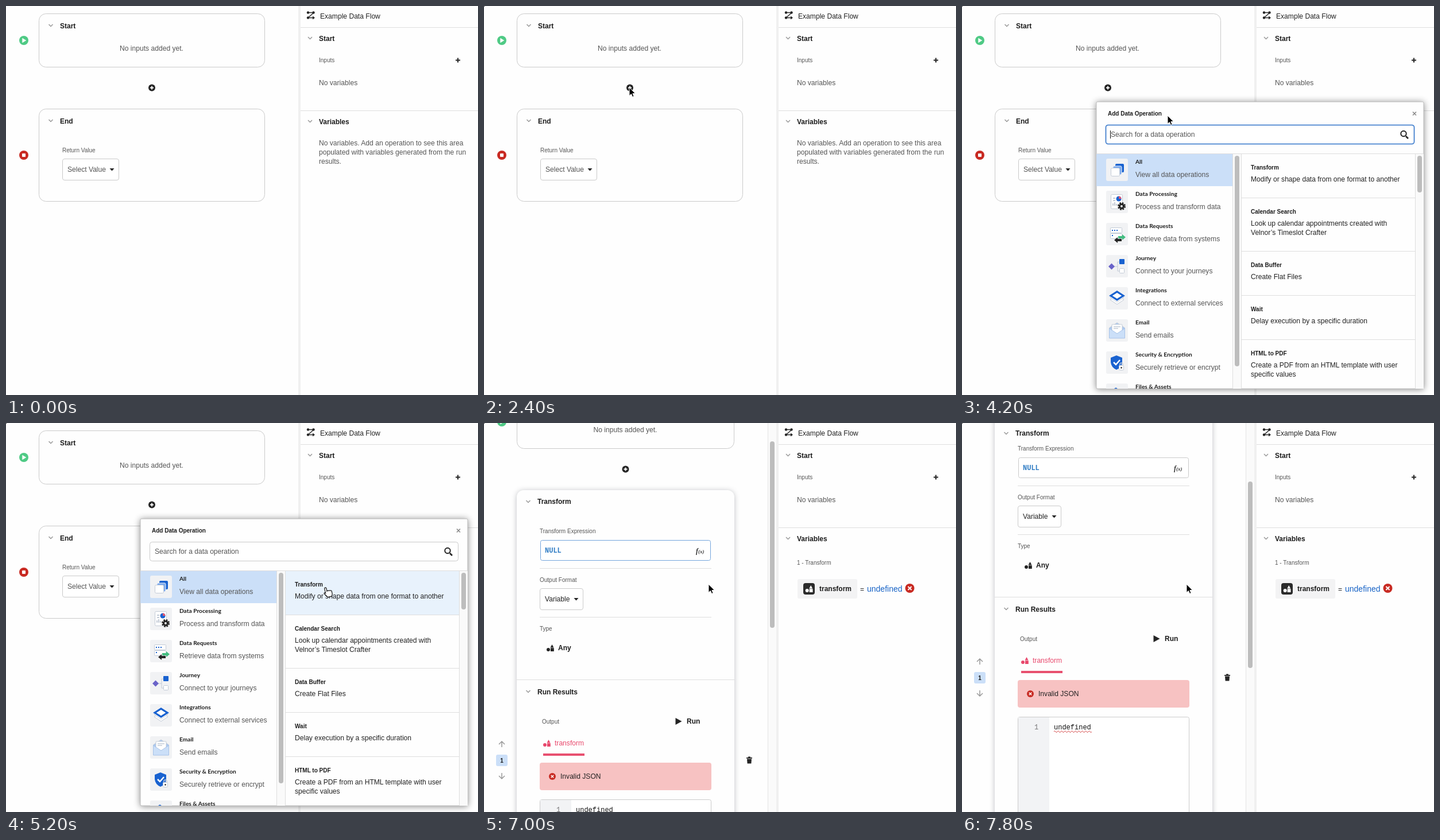
Animation, 822 px wide and 678 px high, one loop 8 s. Source, as an HTML page:

```html
<!DOCTYPE html>
<html lang="en">
<head>
<meta charset="utf-8">
<title>Data flow builder</title>
<style>
html, body { margin: 0; width: 100%; height: 100%; overflow: hidden; background: #fefefe; }
svg { display: block; }
text { font: 12.1px "Liberation Sans", Arial, sans-serif; fill: #555; white-space: pre; }
.b { font-weight: bold; font-size: 12px; fill: #1c1c1c; }
.s { font-size: 10px; }
.d { fill: #222; }
.h { font-weight: bold; font-size: 10px; fill: #1c1c1c; }
.c { font: bold 10.2px Lato, sans-serif; fill: #1c1c1c; }
.m { font: 12px "Liberation Mono", monospace; fill: #111; }
.mid { text-anchor: middle; }
.pink { fill: #e8486c; }
.blue { fill: #1763c6; font-size: 14px; }
.null { font-weight: bold; fill: #2f7cc4; }
.fx { font: italic bold 12px "Liberation Serif", serif; fill: #333; }
.glow { filter: drop-shadow(0 1px 5px rgba(40, 45, 60, .3)); }
.lift { filter: drop-shadow(0 1px 6px rgba(0, 0, 0, .45)); }
</style>
</head>
<body>
<svg id="stage" width="822" height="678" viewBox="0 0 822 678"></svg>
<script>
const INK = '#242424', RED = '#c82a22', BLUE = '#1962d0', LINE = '#dedede', EDGE = '#cacaca';

const text = (x, y, s, cls = '') => `<text x="${x}" y="${y}" class="${cls}">${s}</text>`;
const rect = (x, y, w, h, fill, r = 0, stroke = 'none', extra = '') =>
  `<rect x="${x}" y="${y}" width="${w}" height="${h}" rx="${r}" fill="${fill}" stroke="${stroke}" ${extra}/>`;
const path = (d, fill, stroke = 'none', w = 1) =>
  `<path d="${d}" fill="${fill}" stroke="${stroke}" stroke-width="${w}"/>`;
const disc = (x, y, r, fill) => `<circle cx="${x}" cy="${y}" r="${r}" fill="${fill}"/>`;
const group = (id, body, extra = '') => `<g id="${id}" ${extra}>${body}</g>`;
const at = (x, y, body) => `<g transform="translate(${x} ${y})">${body}</g>`;
const hline = (x, y, w) => rect(x, y, w, 1, LINE);

const chevron = (x, y) => path(`M${x - 3.5} ${y - 2}l3.5 3.5 3.5-3.5`, 'none', '#999', 1.5);
const caret = (x, y) => path(`M${x - 4} ${y - 2}h8l-4 4.5z`, INK);
const plus = (x, y, color = INK) => disc(x, y, 6, color) + path(`M${x - 3} ${y}h6m-3-3v6`, 'none', '#fff', 1.8);
const cross = (x, y, r) => {
  const a = r * .38;
  return disc(x, y, r, RED) + path(`M${x - a} ${y - a}l${2 * a} ${2 * a}m0 ${-2 * a}l${-2 * a} ${2 * a}`, 'none', '#fff', r / 4);
};
const shapes = (x, y, color) => at(x, y, disc(3, 9, 3, color) + rect(7, 6.2, 5.8, 5.8, color) + path('M6.5 5.4l3-5.4 3 5.4z', color));
const select = (x, y, w, label, cls) =>
  rect(x + .5, y + .5, w - 1, 37, '#fff', 3.5, EDGE) + text(x + 9, y + 23, label, cls) + caret(x + w - 12.5, y + 19);

const startCard = w =>
  rect(57.5, 13.5, w, 93, '#fefefe', 12, EDGE) + chevron(78, 34) + text(94, 39, 'Start', 'b') +
  text(57 + w / 2, 78, 'No inputs added yet.', 'mid') +
  disc(31, 60, 8, '#4fca85') + path('M28.3 55.8v8.4l7-4.2z', '#fff');

const emptyFlow = startCard(393) +
  group('hover', rect(234, 123, 40, 40, '#f9cbd7', 2) + plus(254, 142.5, '#c9243f')) +
  group('add', plus(254, 142.5)) +
  rect(57.5, 179.5, 393, 161, '#fefefe', 12, EDGE) + chevron(78, 200) + text(94, 205, 'End', 'b') +
  text(98, 255, 'Return Value', 's') + select(98, 266, 99, 'Select Value') +
  disc(31, 260, 8, RED) + rect(28, 257, 6, 6, '#fff', 1);

const squiggle = 'M160 744' + 'q1.5-3 3 0t3 0'.repeat(11);
const builtFlow = startCard(378) + plus(246.5, 142.5) +
  rect(57, 179, 379, 900, '#fefefe', 12, 'none', 'class="glow"') +
  group('sticky', chevron(77, 199) + text(93, 203, 'Transform', 'b')) +
  text(97, 254, 'Transform Expression', 's') +
  rect(98.5, 266.5, 296, 35, '#fff', 3, EDGE, 'id="field"') +
  text(106, 288, 'NULL', 'm null') + text(369, 289, 'f<tspan font-size="9">(x)</tspan>', 'fx') +
  hline(97, 315, 299) + text(97, 339, 'Output Format', 's') + select(97, 350, 76, 'Variable', 'd') +
  hline(97, 400, 299) + text(97, 424, 'Type', 's') + shapes(109, 448, INK) + text(129, 458, 'Any', 'b') +
  hline(57, 509, 379) + chevron(77, 530) + text(93, 535, 'Run Results', 'b') +
  text(101, 586, 'Output', 's') + path('M333.500 576v12l11-6z', INK) + text(353, 586, 'Run', 'b') +
  shapes(103, 614, '#e8486c') + text(123, 624, 'transform', 'pink') + rect(103, 638, 72, 4, '#e8506f') +
  rect(97, 654, 299, 48, '#f7c2c2', 4) + cross(119, 678, 6) + text(133, 682, 'Invalid JSON', 'd') +
  rect(97.5, 718.5, 298, 300, '#fff', 3, EDGE) + rect(98, 719, 54, 300, '#f2f3f5') +
  `<g opacity=".55">${text(126, 740, '1', 'm')}</g>` + text(160, 740, 'undefined', 'm') + path(squiggle, 'none', '#d23b3b') +
  path('M31 627v-10m-5 5l5-5 5 5M31 672v10m-5-5l5 5 5-5', 'none', '#999', 1.5) +
  rect(21, 640, 20, 20, '#cbdff8', 3) + text(31, 653.5, '1', 'h mid') +
  path('M457 645h10v1.700h-10zm3-1.500h4v1.500h-4zM458 647.500h8l-.6 8h-6.800z', INK);

const sidebar = rect(509, 0, 313, 678, '#fefefe') + rect(509, 0, 4, 678, '#f0f0f0') +
  path('M526 11.500h10M536 11.500L526 20.500h10', 'none', INK, 1.4) +
  disc(526, 11.5, 2.2, INK) + disc(535.5, 11.5, 2.2, INK) + disc(526, 20.5, 2.2, INK) + path('M534 17.500l4 3-4 3z', INK) +
  text(547, 22, 'Example Data Flow', 'd') + hline(513, 37, 309) +
  chevron(529.5, 56) + text(545, 61, 'Start', 'b') + text(545, 98, 'Inputs', 's') +
  path('M783 94.500h8m-4-4v8', 'none', INK, 2) + text(545, 138, 'No variables') +
  hline(513, 182, 309) + chevron(529.5, 201) + text(545, 206, 'Variables', 'b') +
  group('noVars', ['No variables. Add an operation to see this area',
    'populated with variables generated from the run', 'results.'].map((s, i) => text(545, 243 + 16 * i, s)).join('')) +
  group('vars', text(545, 247, '1 - Transform', 's') + rect(546, 272, 104, 34, '#f3f3f4', 3) +
    rect(556, 279, 20, 20, '#2b2b2b', 4) + shapes(559.7, 283, '#fff') + text(584, 293, 'transform', 'b') +
    text(655, 294, '=', 'd') + text(667, 294, 'undefined', 'blue') + cross(741.5, 288, 8));

// Small pictures on a 38 px tile
const page = '#fff', rim = '#c3cbd6';
const tiles = [
  rect(16, 9, 15, 15, BLUE, 2) + rect(12, 13, 15, 15, '#7aa9ee', 2, '#f2f3f5') + rect(8.5, 16.5, 15, 14, page, 2, rim),
  rect(8.5, 6.5, 20, 25, page, 2, rim) + disc(22, 14, 4.5, BLUE) + path('M22 14v-4.500a4.500 4.500 0 0 1 4.500 4.500z', '#e5546e') +
    path('M12 13h4m-4 4h4m-4 9v-4m3 4v-6m3 6v-3', 'none', rim, 2) +
    `<circle cx="27" cy="27" r="5.500" fill="none" stroke="${INK}" stroke-width="3" stroke-dasharray="2.600 1.720"/>` +
    '<circle cx="27" cy="27" r="3.500" fill="none" stroke="#242424" stroke-width="3"/>',
  rect(7.5, 8.5, 20, 9, page, 1, rim) + rect(7.5, 18.5, 20, 9, page, 1, rim) +
    path('M10 13h2m2 0h2m2 0h2M10 22h2', 'none', BLUE, 2) + path('M21 23h7v-3l6 5-6 5v-3h-7z', '#42bd80') + path('M27 28h-7v-3l-6 5 6 5v-3h7z', INK),
  path('M14 20h6M20 20v-8h4M20 20v8h4', 'none', rim, 1) + path('M9.500 14.500l5.500 5.500-5.500 5.500L4 20z', '#6a63c9') +
    rect(23, 7, 9, 9, BLUE, 1) + rect(23.5, 23.5, 8, 8, page, 1, rim),
  path('M7 22l12 8 12-8-12-8z', page, rim) + path('M7 18l12 8 12-8-12-8z', page, rim) + path('M8 15l11 7 11-7-11-7z', page, BLUE, 3.2),
  path('M5.500 15L19 6l13.500 9v17h-27z', '#a9c8f2', rim) + rect(10, 9, 18, 16, page, 1, rim) +
    path('M13 13h12m-12 3h8', 'none', rim, 1.5) + path('M5.500 16L19 25l13.500-9v17h-27z', '#cbdff8', '#a8c3e8'),
  path('M18 7l10 4v8q-1 9-10 13-9-4-10-13v-8z', BLUE) + path('M13 19l4 4 7-8', 'none', '#fff', 2.5) +
    rect(22.5, 24.5, 8, 8, page, 1, rim) + path('M24 24v-2.500q2.500-3 5 0v2.500', 'none', rim, 1.4) + disc(26.5, 28.5, 1.3, INK),
  path('M14 11q3-6 6 0', 'none', BLUE, 1.6) + rect(8.5, 10.5, 20, 16, page, 2, rim)
];
const categories = [
  ['All', 'View all data operations'], ['Data Processing', 'Process and transform data'],
  ['Data Requests', 'Retrieve data from systems'], ['Journey', 'Connect to your journeys'],
  ['Integrations', 'Connect to external services'], ['Email', 'Send emails'],
  ['Security &amp; Encryption', 'Securely retrieve or encrypt'], ['Files &amp; Assets', '']
];
const operations = [
  [258, 'Transform', 'Modify or shape data from one format to another'],
  [335, 'Calendar Search', 'Look up calendar appointments created with', 'Velnor’s Timeslot Crafter'],
  [428, 'Data Buffer', 'Create Flat Files'],
  [505, 'Wait', 'Delay execution by a specific duration'],
  [582, 'HTML to PDF', 'Create a PDF from an HTML template with user', 'specific values']
];
const dialog = rect(234, 167, 570, 500, '#fefefe', 2, '#bbb', 'class="lift"') +
  text(254, 191, 'Add Data Operation', 'h') + path('M785 184.500l6 6m0-6l-6 6', 'none', '#888', 1.6) +
  rect(250.5, 207.5, 537, 33, '#fff', 4, EDGE, 'id="search"') + text(259, 228, 'Search for a data operation') +
  group('focus', rect(258, 217, 1, 14, '#111')) +
  path('M773 227l4 4', 'none', INK, 2.6) + `<circle cx="769" cy="222.500" r="4.700" fill="none" stroke="${INK}" stroke-width="2"/>` +
  '<g clip-path="url(#clip)">' + hline(234, 257, 570) + rect(234, 258, 238, 56, '#cbdff8') +
  categories.map(([name, note], i) => at(0, 56 * i,
    at(251, 266, rect(0, 0, 38, 39, '#f1f2f4', 3) + tiles[i]) + text(302, 275, name, 'c') + text(302, 298, note))).join('') +
  rect(471, 258, 16, 409, '#fafafa') + rect(471, 258, 1, 409, LINE) + rect(486, 258, 1, 409, LINE) + rect(475, 261, 8, 367, '#bdbdbd', 4) +
  group('row', rect(487, 258, 303, 76, '#e8f2fc')) +
  operations.map(([y, name, ...notes], i) => (i ? hline(487, y - 1, 303) : '') + text(503, y + 27, name, 'h') +
    notes.map((s, k) => text(503, y + 48 + 16 * k, s, 'd')).join('')).join('') +
  rect(789, 258, 15, 409, '#fafafa') + rect(789, 258, 1, 409, LINE) + rect(793, 261, 8, 64, '#bdbdbd', 4) + '</g>';

const stage = document.getElementById('stage');
stage.innerHTML = '<clipPath id="clip"><rect x="234" y="257" width="570" height="410"/></clipPath>' +
  group('empty', emptyFlow) + group('built', builtFlow) +
  group('bar', rect(494, 0, 15, 678, '#fafafa') + rect(494, 0, 1, 678, '#e4e4e4') + group('thumb', rect(498, 2, 8, 325, '#bdbdbd', 4))) +
  sidebar + group('pop', dialog) +
  group('arrow', path('M0 0V14.500l3.400-3.100 2.300 5.100 2.400-1.100-2.200-4.900h4.600z', '#000', '#fff')) +
  group('hand', path('M-1.600 1.500a1.600 1.600 0 0 1 3.200 0V6.500q1-1.300 2.800 0 1.400-1 2.700.4 2.500-.6 2.600 1.600v4.500l-1.500 4h-7.500l-4.200-6.200q-1.400-2.400.9-2.200l1.100 1z', '#fff', '#111', 1.2)) +
  group('corner', rect(0, 0, 1, 1, '#000'));

const el = {};
stage.querySelectorAll('[id]').forEach(e => el[e.id] = e);
const show = (id, on) => el[id].style.display = on ? '' : 'none';
const move = (id, x, y) => el[id].setAttribute('transform', `translate(${x} ${y})`);
const clamp = v => Math.max(0, Math.min(1, v));
const mix = (a, b, k) => a.map((v, i) => v + (b[i] - v) * k);

function pointer(t) {
  if (t < 2800) return mix([400, 588], [253, 142], 1 - (1 - clamp((t - 200) / 1400)) ** 3);
  if (t < 5600) return mix([259, 143], [556, 287], clamp((t - 3800) / 1200));
  return mix([556, 287], [391, 281], clamp((t - 5800) / 600));
}

const scrollAt = t => [[7800, 206], [7400, 148], [7200, 112], [7000, 62], [6800, 20], [0, 0]].find(p => t >= p[0])[1];

function draw(t) {
  const built = t >= 5400, focused = t < 4400, scroll = scrollAt(t);
  show('empty', !built);
  for (const id of ['built', 'bar', 'vars']) show(id, built);
  show('noVars', !built);

  const over = t >= 2800 && t < 4000;
  show('hover', over);
  show('add', !over);

  show('pop', t >= 3400 && !built);
  const grow = t < 3600 ? 1.0035 : 1;
  el.pop.setAttribute('transform', `translate(519 167) scale(${grow}) translate(-519 -167)`);
  show('focus', focused);
  el.search.setAttribute('stroke', focused ? '#2f72c8' : EDGE);
  el.search.setAttribute('stroke-width', focused ? 1.6 : 1);
  show('row', t >= 4800);

  move('built', 0, -scroll);
  move('sticky', 0, Math.max(0, scroll - 181));
  move('thumb', 0, scroll * .485);
  el.field.setAttribute('stroke', t < 7800 ? '#74a5dc' : EDGE);

  const [x, y] = pointer(t);
  const hand = t >= 2800 && t < 5600 && !(t >= 4000 && y < 258);
  show('hand', hand);
  show('arrow', t >= 200 && !hand);
  show('corner', t >= 200);
  el.hand.setAttribute('transform', `translate(${x} ${y}) rotate(-12)`);
  move('arrow', x, y);
}

function tick() {
  draw(Math.floor(performance.now() % 8000 / 200) * 200);
  requestAnimationFrame(tick);
}
tick();
</script>
</body>
</html>
```
